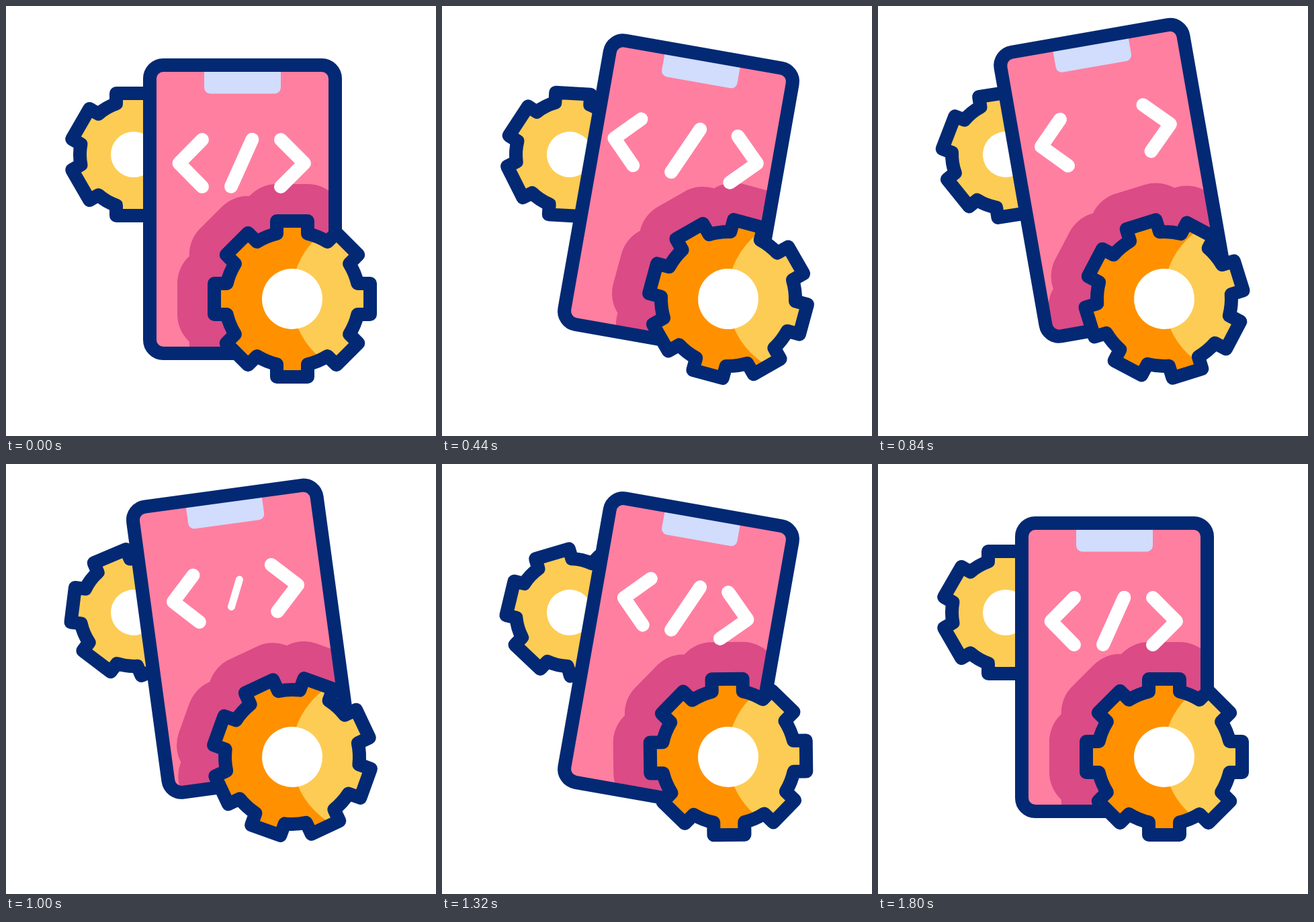
Recreate the animation shown at these times as an HTML page with a canvas. Size 640 by 640 pixels, loop 1880 ms.

```html
<!DOCTYPE html>
<html lang="en">
<head>
<meta charset="utf-8">
<title>App development</title>
<style>
  html, body { margin: 0; width: 100%; height: 100%; overflow: hidden; background: #fff; }
  canvas { display: block; width: 100vw; height: 100vh; object-fit: contain; }
</style>
</head>
<body>
<canvas id="stage" width="640" height="640"></canvas>
<script>
const ctx = document.getElementById('stage').getContext('2d');
const LOOP = 1880, STEP = 40, LINE = 20;
const NAVY = '#032974', PINK = '#ff7fa1', SHADE = '#db4b86', NOTCH = '#d2dcfc';
const ORANGE = '#ff9100', YELLOW = '#fdcc54', WHITE = '#fff';

// Tracks: [time, value] pairs joined by one symmetric ease.
const TRACKS = {
  tilt: [[0, 0], [432, 10], [866, -10], [1333, 10], [1712, 0]],
  rise: [[20, 302.5], [897, 259.5], [1712, 302.5]],
  spread: [[0, 0], [520, 15], [1055, 0]],
  slash: [[440, 1], [660, 0], [870, 0], [1120, 1]],
  front: [[112, 0], [1402, 180]],
  back: [[252, 0], [1702, 180]]
};

// cubic-bezier(.6, 0, .4, 1), solved by bisection
function ease(p) {
  let lo = 0, hi = 1, u = 0.5;
  for (let i = 0; i < 24; i++) {
    u = (lo + hi) / 2;
    const v = 1 - u;
    const x = 1.8 * v * v * u + 1.2 * v * u * u + u * u * u;
    if (x < p) lo = u; else hi = u;
  }
  return u * u * (3 - 2 * u);
}

function valueAt(track, t) {
  if (t <= track[0][0]) return track[0][1];
  for (let i = 1; i < track.length; i++) {
    const [t0, a] = track[i - 1], [t1, b] = track[i];
    if (t < t1) return a + (b - a) * ease((t - t0) / (t1 - t0));
  }
  return track[track.length - 1][1];
}

const rad = deg => deg * Math.PI / 180;

function gearPath(teeth, ring, tip, half) {
  const path = new Path2D(), base = Math.sqrt(ring * ring - half * half);
  const gap = Math.asin(half / ring), turn = 2 * Math.PI / teeth;
  for (let i = 0; i < teeth; i++) {
    const a = i * turn, c = Math.cos(a), s = Math.sin(a);
    for (const [x, y] of [[-half, -base], [-half, -tip], [half, -tip], [half, -base]])
      path.lineTo(x * c - y * s, x * s + y * c);
    const mid = a - Math.PI / 2;
    path.arc(0, 0, ring, mid + gap, mid + turn - gap);
  }
  path.closePath();
  return path;
}

const FRONT = { x: 426, y: 436, hub: 45, path: gearPath(8, 100, 116, 23) };
const BACK = { x: 190, y: 221, hub: 34, path: gearPath(6, 80, 91, 26) };
const BODY = new Path2D();
BODY.roundRect(-138, -214.5, 276, 429, 20);

function at(x, y, deg, draw) {
  ctx.save();
  ctx.translate(x, y);
  ctx.rotate(rad(deg));
  draw();
  ctx.restore();
}

function disc(x, y, r, color) {
  ctx.fillStyle = color;
  ctx.beginPath();
  ctx.arc(x, y, r, 0, 2 * Math.PI);
  ctx.fill();
}

function outline(path, color, width = LINE) {
  ctx.strokeStyle = color;
  ctx.lineWidth = width;
  ctx.stroke(path);
}

function polyline(...points) {
  const path = new Path2D();
  points.forEach(([x, y]) => path.lineTo(x, y));
  outline(path, WHITE);
}

function drawGear(gear, deg, split) {
  at(gear.x, gear.y, deg, () => {
    ctx.save();
    ctx.clip(gear.path);
    ctx.rotate(rad(-deg));
    ctx.fillStyle = split ? ORANGE : YELLOW;
    ctx.fillRect(-140, -140, 280, 280);
    if (split) disc(119, -4, 120, YELLOW);
    ctx.restore();
    outline(gear.path, NAVY);
    disc(0, 0, gear.hub, WHITE);
  });
}

function drawCode(spread, slash) {
  const top = -103.5, mid = -68.5, low = -33.5;
  polyline([-60 - spread, top], [-94.5 - spread, mid], [-60 - spread, low]);
  polyline([57 + spread, top], [92 + spread, mid], [57 + spread, low]);
  if (slash > 0.01) {
    ctx.save();
    ctx.translate(-1.3, -68.8);
    ctx.scale(slash, slash);
    polyline([15.7, -35], [-15.7, 35]);
    ctx.restore();
  }
}

function drawPhone(y, tilt, gearTurn, spread, slash) {
  const x = 352;
  at(x, y, tilt, () => {
    ctx.fillStyle = PINK;
    ctx.fill(BODY);
    ctx.save();
    ctx.clip(BODY);
    ctx.rotate(rad(-tilt));
    at(FRONT.x - x, FRONT.y - y, gearTurn, () => {
      ctx.fillStyle = SHADE;
      ctx.fill(FRONT.path);
      outline(FRONT.path, SHADE, 110);
    });
    ctx.restore();
    ctx.fillStyle = NOTCH;
    ctx.beginPath();
    ctx.roundRect(-57, -208, 114, 36, [0, 0, 9, 9]);
    ctx.fill();
    outline(BODY, NAVY);
    drawCode(spread, slash);
  });
}

function draw(t) {
  const v = {};
  for (const name in TRACKS) v[name] = valueAt(TRACKS[name], t);
  ctx.fillStyle = WHITE;
  ctx.fillRect(0, 0, 640, 640);
  ctx.lineCap = ctx.lineJoin = 'round';
  drawGear(BACK, v.back, false);
  drawPhone(v.rise, v.tilt, v.front, v.spread, v.slash);
  drawGear(FRONT, v.front, true);
}

const start = performance.now();
function tick() {
  const t = (performance.now() - start) % LOOP;
  draw(Math.floor(t / STEP) * STEP);
  requestAnimationFrame(tick);
}
tick();
</script>
</body>
</html>
```
